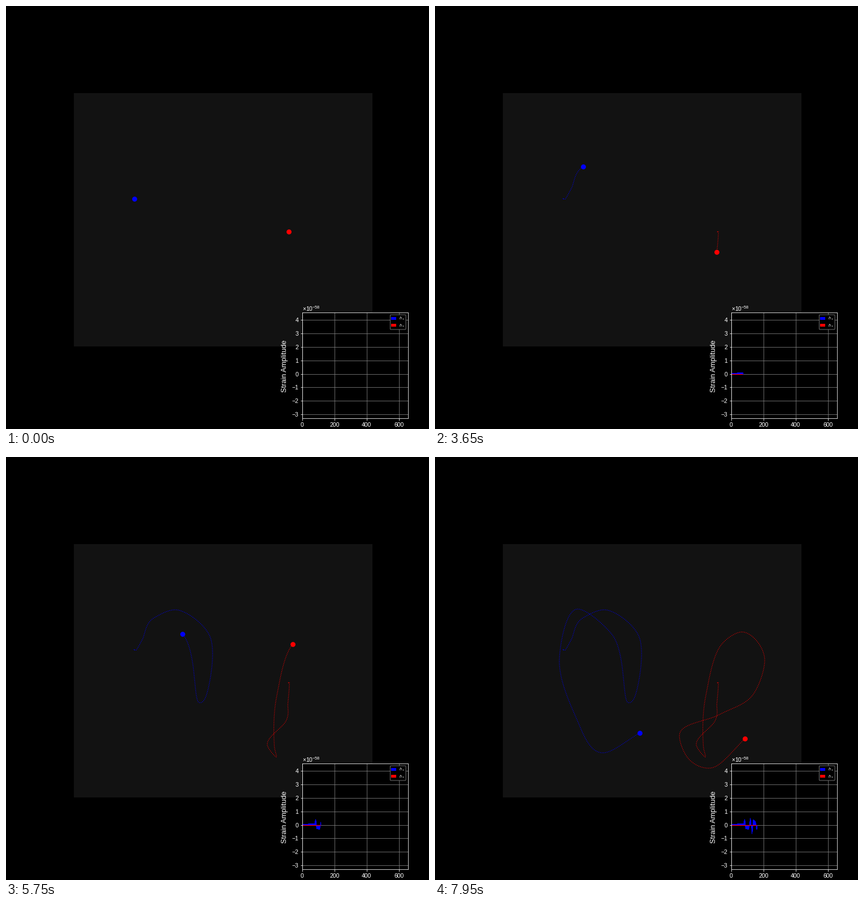
Write a matplotlib script that moves like this. It is 748x748 px and loops after 8 s.

```python
import numpy as np
import matplotlib.pyplot as plt
from matplotlib.animation import FuncAnimation
from matplotlib.collections import LineCollection
from matplotlib.patches import FancyBboxPatch, Rectangle

SIZE, DPI = 748, 100
FRAMES, STEP = 160, 50
SUB = 8  # trail samples per frame
PX = 72 / DPI  # points per pixel
HAIR = 0.8 * PX

plt.rcParams.update({
    "font.family": "Liberation Sans",
    "mathtext.fontset": "custom",
    "mathtext.rm": "Liberation Sans",
    "mathtext.it": "Liberation Sans:italic",
    "text.color": "white",
})

# Turning points of each orbit: frame, x, y
BLUE_TURNS = [
    (0, 227, 340.5), (38, 227, 341), (49, 230.5, 341), (62, 241, 323),
    (73, 262.5, 284), (80, 306, 271), (88, 360.5, 317), (98, 353.5, 423.5),
    (103, 341, 434), (115, 312, 312.5), (122, 251, 269), (131, 220, 356),
    (141, 247, 455), (152, 299, 523), (159, 362, 488),
]
RED_TURNS = [
    (0, 500, 399), (38, 500, 399), (46, 501, 398.5), (55, 501, 405),
    (73, 498.4, 435), (83, 495, 467), (92, 462.5, 511), (96, 478, 530.5),
    (100, 474.5, 511), (108, 478.5, 424), (115, 507, 331), (119, 541, 309.5),
    (126, 583, 359), (131, 562.5, 420), (137, 504, 455), (144, 432.5, 490),
    (148, 447, 532), (153, 490, 549.5), (159, 548.5, 498),
]
# Peaks of the plus strain: frame, amplitude
PEAKS = [(0, .05), (76, .12), (83, .43), (88, -.25), (107, -.32), (118, .52),
         (129, -.63), (136, .4), (150, .25), (156, -.32), (159, -.3)]


def smooth_path(turns):
    """Cubic Hermite curve through timed points."""
    turns = np.array(turns, float)
    t, p = turns[:, 0], turns[:, 1:]
    slope = np.gradient(p, t, axis=0)
    s = np.arange((FRAMES - 1) * SUB + 1) / SUB
    i = np.clip(np.searchsorted(t, s, side="right") - 1, 0, len(t) - 2)
    h = (t[i + 1] - t[i])[:, None]
    u = (s - t[i])[:, None] / h
    ease = u * u * (3 - 2 * u)
    return (p[i] + ease * (p[i + 1] - p[i])
            + h * u * (1 - u) * ((1 - u) * slope[i] - u * slope[i + 1]))


def pixel_axes(zorder):
    ax = fig.add_axes([0, 0, 1, 1], zorder=zorder)
    ax.set(xlim=(0, SIZE), ylim=(SIZE, 0))
    ax.axis("off")
    return ax


def make_body(turns, color):
    trail, = stage.plot([], [], ":", color=color, lw=0.8)
    dot, = stage.plot([], [], "o", color=color, ms=8.8 * PX, mew=0, zorder=4)
    return smooth_path(turns), trail, dot


fig = plt.figure(figsize=(SIZE / DPI, SIZE / DPI), dpi=DPI, facecolor="black")
stage = pixel_axes(0)
stage.add_patch(Rectangle((120, 154), 528, 448, fc="#121212", lw=0))
bodies = [make_body(BLUE_TURNS, "blue"), make_body(RED_TURNS, "red")]

# Strain chart
chart = fig.add_axes([0.7, 0.025, 0.25, 0.25], facecolor="black", zorder=1)
chart.set(xlim=(0, 655), ylim=(-3.29, 4.52),
          xticks=range(0, 601, 200), yticks=range(-3, 5))
chart.grid(color="gray", lw=HAIR)
chart.tick_params(colors="white", labelsize=10.4 * PX, length=3.5 * PX,
                  pad=2.8 * PX, width=HAIR)
for spine in chart.spines.values():
    spine.set(color="white", linewidth=HAIR)
bars = chart.add_collection(LineCollection([], colors="blue", lw=0.9, zorder=1.8),
                            autolim=False)
cross, = chart.plot([], [], color="red", lw=0.9, zorder=2, solid_capstyle="butt")

# Chart labels and legend
labels = pixel_axes(2)
labels.text(493.3, 636.3, "Strain Amplitude", rotation=90, ha="center",
            va="center", fontsize=12.6 * PX)
labels.text(524.3, 540, r"$\mathrm{\times10^{-58}}$", fontsize=10.4 * PX)
labels.add_patch(FancyBboxPatch((679.3, 546), 27.8, 26,
                                boxstyle="round,pad=0,rounding_size=1.4",
                                fc="black", ec="#8c8c8c", lw=HAIR))
for y, color, sign in ((552.3, "blue", "+"), (564.3, "red", r"\times")):
    labels.add_patch(Rectangle((681.5, y - 2.6), 8.3, 5.2, fc=color, lw=0))
    labels.text(694.6, y + 2.4, rf"$\mathit{{h}}_{{\,{sign}}}$", fontsize=7.2 * PX)

plus = np.interp(np.arange(FRAMES), *np.array(PEAKS).T)


def draw(n):
    for path, trail, dot in bodies:
        past = path[:n * SUB + 1]
        trail.set_data(past[:, 0], past[:, 1])
        dot.set_data(past[-1:, 0], past[-1:, 1])
    bars.set_segments([[(k, 0), (k, plus[k])] for k in range(n)])
    cross.set_data([0, n], [0, 0])
    cross.set_visible(n > 0)
    return []


anim = FuncAnimation(fig, draw, frames=FRAMES, interval=STEP, repeat=True,
                     repeat_delay=0, init_func=lambda: draw(0))
plt.show()
```
